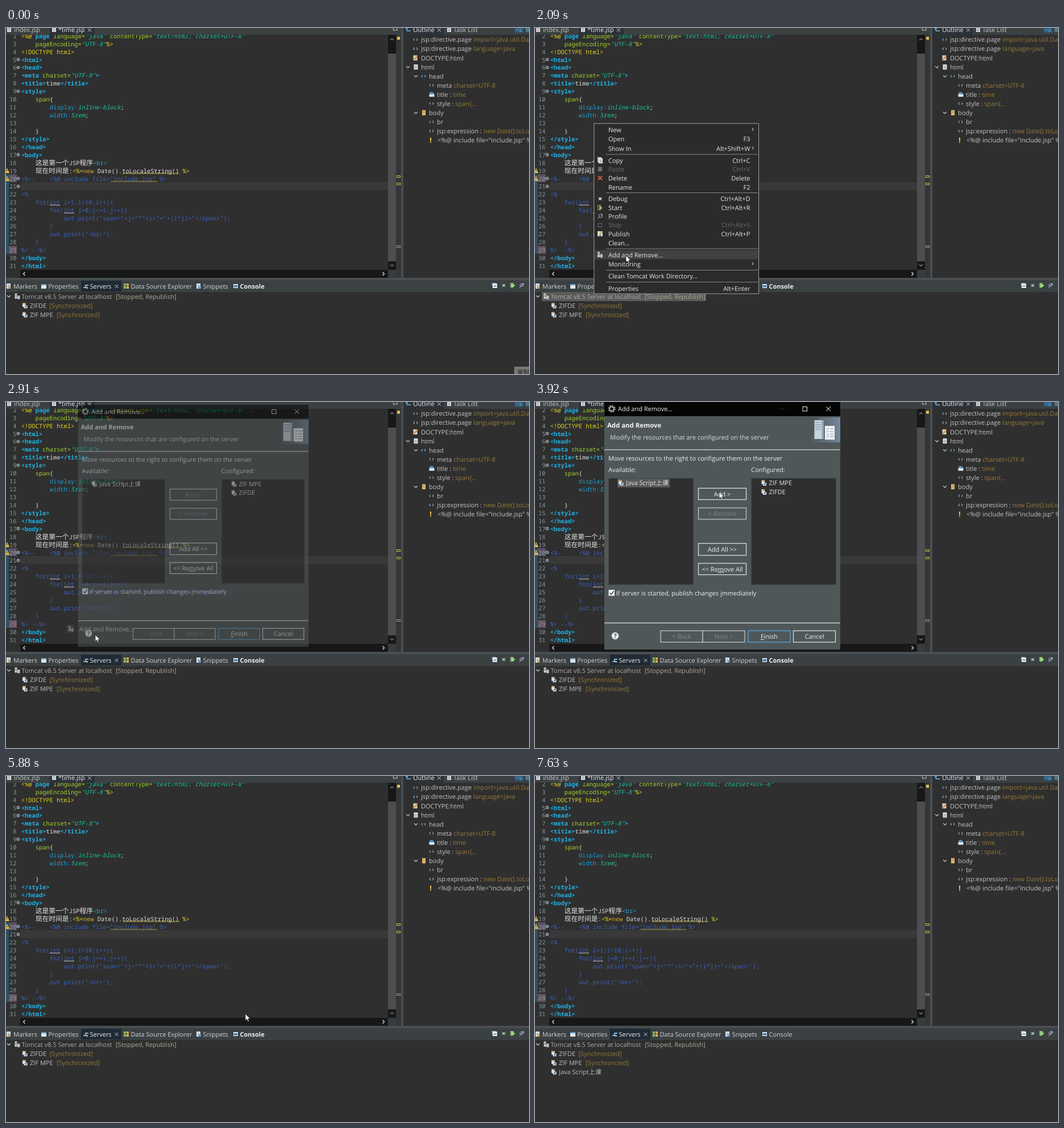
These frames come from a looping animation (920x608 px, 7.69 s). An HTML page:

```html
<!DOCTYPE html>
<html lang="zh">
<head>
<meta charset="utf-8">
<title>Add and Remove</title>
<style>
html, body { margin: 0; width: 100%; height: 100%; overflow: hidden; background: #2f2f2f; }
svg { display: block; width: 920px; height: 608px; }
text { font: 11px "Open Sans", "Noto Sans CJK SC", "Noto Sans CJK", sans-serif; white-space: pre; text-rendering: geometricPrecision; }
.code { font: 10.42px "Noto Sans Mono", monospace; }
.cjk { font: 11.8px "Noto Sans CJK SC", "Noto Sans CJK", sans-serif; }
.bold { font-weight: bold; }
.ital { font-style: italic; }
</style>
</head>
<body>
<svg id="stage" viewBox="0 0 920 608"></svg>
<script>
const LOOP = 7690;
const BG = '#2f2f2f', BAR = '#3b4043', FORM = '#4f5759', PALE = '#d2d2d2', BROWN = '#967937';

// drawing helpers
const esc = s => s.replace(/&/g, '&amp;').replace(/</g, '&lt;');
const rect = (x, y, w, h, fill, more = '') => `<rect x="${x}" y="${y}" width="${w}" height="${h}" fill="${fill}" ${more}/>`;
const line = (d, color, w = 1, more = '') => `<path d="${d}" fill="none" stroke="${color}" stroke-width="${w}" ${more}/>`;
// an underscore marks the underlined access key
const text = (x, y, s, fill = PALE, more = '') => `<text x="${x}" y="${y}" fill="${fill}" ${more}>` +
  esc(s).replace(/_(.)/, '<tspan text-decoration="underline">$1</tspan>') + '</text>';
const during = (spans, body) => `<g data-on="${spans}">${body}</g>`;
const cross = (x, y, r, color = PALE) => line(`M${x - r} ${y - r}l${2 * r} ${2 * r}m0 ${-2 * r}l${-2 * r} ${2 * r}`, color);
const chevron = (x, y, dir, color = PALE, r = 3) => {
  const a = { down: 90, up: -90, left: 180, right: 0 }[dir];
  return line(`M${-r / 2} ${-r}L${r / 2} 0L${-r / 2} ${r}`, color, 1.2, `transform="translate(${x} ${y}) rotate(${a})"`);
};
const wave = (x0, x1, y, color) => {
  let d = `M${x0} ${y}`;
  for (let x = x0, up = 1; x < x1; x += 2, up = -up) d += `l2 ${-up * 1.6}`;
  return line(d, color, 0.9);
};
const page = (x, y, color = '#e4e4e4') =>
  rect(x, y, 7, 9, color) + line(`M${x + 1.5} ${y + 3}h4m-4 2h4m-4 2h4`, '#5f7f9d', 0.8);
const moduleIcon = (x, y) => rect(x, y, 5.5, 7, '#d8dde0') + rect(x, y, 5, 2, '#c9a36a') +
  rect(x + 2.5, y + 4.5, 6, 5, '#e6e6e6') + `<circle cx="${x + 5.8}" cy="${y + 6.8}" r="1.7" fill="#4a86b8"/>`;
const tagIcon = (x, y) => chevron(x - 2.6, y, 'left', '#69a7d6', 2) + chevron(x + 2.6, y, 'right', '#69a7d6', 2);
const serverIcon = (x, y) => rect(x, y, 4, 9, '#d5dbe0') + line(`M${x} ${y + 2.5}h4m-4 2.5h4`, '#50616e') +
  rect(x + 4.5, y + 4, 4.5, 6, '#b3c6d4') + rect(x + 4.5, y + 4, 4.5, 1.5, '#d9b36a');

// source code: each line is a list of [style, words]
const INK = { w: '#e0e0e0', h: '#e4e4e4', b: '#1fb2e6', l: '#2aa5cf', a: '#a5d32e', v: '#17c69f',
  y: '#e3d51c', k: '#d6a62a', c: '#3b62bd', p: '#1d9fd4' };
const CODE = [
  [['y', '<%@ '], ['b', 'page '], ['a', 'language='], ['v', '"java" '], ['a', 'contentType='], ['v', '"text/html; charset=UTF-8"']],
  [['a', '    pageEncoding='], ['v', '"UTF-8"'], ['y', '%>']],
  [['y', '<!DOCTYPE html>']],
  [['b', '<html>']],
  [['b', '<head>']],
  [['b', '<meta '], ['a', 'charset='], ['v', '"UTF-8"'], ['b', '>']],
  [['b', '<title>'], ['w', 'time'], ['b', '</title>']],
  [['b', '<style>']],
  [['a', '    span'], ['w', '{']],
  [['p', '        display:'], ['v', 'inline-block'], ['w', ';']],
  [['p', '        width:'], ['v', '5rem'], ['w', ';']],
  [],
  [['w', '    }']],
  [['b', '</style>']],
  [['b', '</head>']],
  [['b', '<body>']],
  [['w', '    '], ['h', '这是第一个'], ['w', 'JSP'], ['h', '程序'], ['l', '<br>']],
  [['w', '    '], ['h', '现在时间是'], ['w', ':'], ['y', '<%='], ['k', 'new '], ['w', 'Date().toLocaleString() '], ['y', '%>']],
  [['c', '<%--    <%@ include file="include.jsp" %>']],
  [],
  [['c', '<%']],
  [['c', '    for(int i=1;i<10;i++){']],
  [['c', '        for(int j=0;j<=i;j++){']],
  [['c', '            out.print("span>"+j+"*"+i+"="+(i*j)+"</span>");']],
  [['c', '        }']],
  [['c', '        out.print("<br>");']],
  [['c', '    }']],
  [['c', '%> --%>']],
  [['b', '</body>']],
  [['b', '</html>']]
];
const FACE = { b: 'bold', v: 'ital', h: 'cjk' };
const mid = n => 28 + (n - 3) * 13.93;

function editor() {
  let s = rect(0, 257, 5, 140, '#2b5263') + rect(5, 257, 14, 14, '#5d4f62') + rect(5, 383, 14, 14, '#66525f');
  s += rect(26, 271, 646, 14, '#393939');
  CODE.forEach((parts, i) => {
    const n = i + 2, y = mid(n) + 3.7;
    s += text(18.5, y, '' + n, '#8797a0', 'class="code" text-anchor="end"');
    s += `<text class="code" x="26.7" y="${y}">` + parts.map(([k, w]) =>
      `<tspan fill="${INK[k]}" class="${FACE[k] || ''}">${esc(w)}</tspan>`).join('') + '</text>';
  });
  for (const n of [5, 6, 9, 17, 20, 21])
    s += `<circle cx="21.5" cy="${mid(n) - 0.5}" r="2.9" fill="#8f9a9f"/>` + line(`M20 ${mid(n) - 0.5}h3`, '#2f2f2f');
  for (const n of [19, 20])
    s += `<path d="M-2 ${mid(n) + 4}L2 ${mid(n) - 5}L6 ${mid(n) + 4}Z" fill="#e8c84a"/>` + line(`M2 ${mid(n) - 2}v3.5`, '#333');
  s += wave(205, 305, 256.5, '#d9c838') + wave(184, 265, 270.5, '#c9b030') + wave(77, 95, 312, '#ddd') + wave(102, 120, 326, '#ddd');
  return `<g clip-path="url(#pane)">${s}</g>`;
}

function scrollbars() {
  const mark = (y, c) => rect(687.5, y, 6, 3, 'none', `stroke="${c}"`);
  return rect(672, 12, 14, 412, '#4c4e4f') + rect(672, 12, 14, 33, '#171717') + rect(672, 410, 14, 15, '#171717') +
    chevron(679, 20, 'up', '#888') + chevron(679, 417, 'down', '#888') +
    rect(25, 425, 647, 14, '#171717') + chevron(32, 432, 'left', '#e8e8e8') + chevron(664, 432, 'right', '#e8e8e8') +
    rect(672, 425, 14, 14, '#393c3e') + rect(686, 12, 9, 427, '#333638') +
    rect(688, 15.5, 5, 5, '#e5c552') + mark(259.5, '#d6c32f') + mark(272.5, '#d6c32f') + mark(382.5, '#999');
}

function topTabs() {
  return rect(0, 0, 695, 12, BAR) + rect(77, 0, 79, 12, '#2b3238') + page(2, -2) + page(81, -2) +
    text(14, 7, 'index.jsp', '#c8c8c8') + text(92, 7, '*time.jsp', '#ececec') + cross(147, 3.5, 3) +
    rect(681.5, -2, 6.5, 6, 'none', 'stroke="#ccc"') +
    rect(699, 0, 221, 12, BAR) + rect(699, 0, 71, 12, '#2b3238') +
    line('M703 1h4m-2 4h7m-7 -7v7', '#7db6dc', 1.4) + text(716, 7, 'Outline', '#ececec') + cross(762, 3.5, 3) +
    rect(776, -1, 7, 8, '#d7dce0') + line('M777.5 2h4m-4 2.5h4', '#58788e') + text(787, 7, 'Task List', '#c8c8c8') +
    rect(895, 0, 15, 8, '#2e5f80') + line('M898 3h3m2 0h4m-4 3h4', '#7fb5d8') + rect(914, 0, 6, 7, '#4e7890');
}

// [text column, label, value, arrow]
const OUTLINE = [
  [730, 'jsp:directive.page ', 'import=java.util.Date'], [730, 'jsp:directive.page ', 'language=java'],
  [730, 'DOCTYPE:html', ''], [730, 'html', '', 1], [744, 'head', '', 1],
  [758, 'meta ', 'charset=UTF-8'], [758, 'title : ', 'time'], [758, 'style : ', 'span{...'], [744, 'body', '', 1],
  [758, 'br', ''], [758, 'jsp:expression : ', 'new Date().toLocaleString()'], [759, '<%@ include file="include.jsp" %>', '']
];
function outline() {
  return OUTLINE.map(([x, label, value, open], i) => {
    const y = 20.4 + i * 16.06, ix = x - 9.5;
    let icon = tagIcon(ix, y);
    if (i === 2) icon = rect(ix - 4, y - 4.5, 7, 9, '#d9cdb2') + line(`M${ix - 3} ${y + 3}l6 -6`, '#c47a34', 1.8);
    if (i === 3) icon = page(ix - 3, y - 4.5);
    if (i === 6) icon = rect(ix - 4, y - 1, 9, 5, '#e6edf2') + rect(ix - 3, y - 4, 6, 4, '#5d9bd0');
    if (i === 8) icon = rect(ix - 2.5, y - 4.5, 6, 9, '#e5bd6c') + line(`M${ix - 1} ${y - 2}h3m-3 2h3`, '#8d6c2f', 0.8);
    if (i === 11) icon = rect(ix - 3.5, y - 4.5, 2, 6, '#e6c24c') + rect(ix - 3.5, y + 2.5, 2, 2, '#e6c24c');
    return icon + (open ? chevron(x - 23, y, 'down') : '') +
      `<text x="${x}" y="${y + 4}" fill="#c4c4c4">${esc(label)}<tspan fill="${BROWN}">${esc(value)}</tspan></text>`;
  }).join('');
}

function serversView() {
  const y = 458;
  let s = rect(0, 439, 920, 4, '#484e51') + rect(0, 443, 920, 21, BAR) + rect(132, 444, 71, 19, '#1f2a34');
  s += page(1, 449) + '<circle cx="6.5" cy="456" r="2.2" fill="#d39a4a"/>' + text(13, y, 'Markers');
  s += rect(62, 450, 9, 8, '#dfe4e8') + rect(62, 450, 9, 2, '#6b9bc4') + text(74.5, y, 'Properties');
  s += line('M136 456h4v-4h5', '#79b4da', 2) + rect(141, 455, 3, 3, '#d9a355') + text(147.5, y, 'Servers', '#ececec') + cross(194.5, 454, 3);
  s += rect(207, 449, 4, 9, '#8fbf5a') + rect(212, 449, 4, 9, '#d6b24f') + line('M207 453h9', '#444') + text(219.5, y, 'Data Source Explorer');
  s += page(335, 449) + rect(339, 454, 4, 4, '#5d9bd0') + text(346.5, y, 'Snippets');
  s += rect(400, 450, 8, 7, '#dfe8f2') + rect(400.8, 452, 6.4, 3.5, '#3f77b5');
  s += during('0-7630', text(411.5, y, 'Console', '#ececec', 'class="bold"')) + during('7630-7690', text(411.5, y, 'Console'));
  s += rect(855, 448, 7, 6, '#8aa9bd') + rect(856, 449, 8, 8, '#dde6ec') + line('M857.5 453.5h5', '#456');
  s += '<circle cx="875.5" cy="452.5" r="2.2" fill="#8fc6a0"/>' + line('M872 450l7 5m0 -5l-7 5', '#8fc6a0', 0.8);
  s += rect(887, 448, 6, 8, '#7ea46a') + '<path d="M889 448l7 4.500l-7 4.500z" fill="#9bd77a"/>';
  s += '<circle cx="906.5" cy="452" r="2.4" fill="none" stroke="#a8bccb"/>' + line('M903 457l7 -8m-3 0h3.5v3.5', '#a8bccb');
  s += rect(0, 464, 920, 144, BG);
  s += during('740-950,1210-2780,5910-7630', rect(12, 464, 289, 16, '#5a5a5a'));
  s += chevron(5, 471.5, 'down') + serverIcon(15.5, 466.5);
  s += text(27.5, 475.5, 'Tomcat v8.5 Server at localhost', '#adaba6') + text(193, 475.5, '[Stopped, Republish]', '#b0a998');
  s += moduleIcon(29, 483) + text(42, 491.5, 'ZIFDE', '#bdbdbd') + text(76.5, 491.5, '[Synchronized]', BROWN);
  s += moduleIcon(29, 499) + text(42, 507.5, 'ZIF MPE', '#bdbdbd') + text(89, 507.5, '[Synchronized]', BROWN);
  s += during('5910-7690', moduleIcon(29, 515) + text(42, 523.5, 'Java Script上课', '#bdbdbd'));
  return s + during('0-70', rect(894, 595, 26, 13, '#777') + text(899, 609, '录制', '#222'));
}

// [label, centre, shortcut, disabled]
const MENU = [
  ['New', 178.5, '>'], ['Open', 195, 'F3'], ['Show In', 211.5, 'Alt+Shift+W>'],
  ['Copy', 232.5, 'Ctrl+C'], ['Paste', 248, 'Ctrl+V', 1], ['Delete', 263.5, 'Delete'], ['Rename', 279.5, 'F2'],
  ['Debug', 300, 'Ctrl+Alt+D'], ['Start', 315.5, 'Ctrl+Alt+R'], ['Profile', 331, ''], ['Stop', 346, 'Ctrl+Alt+S', 1],
  ['Publish', 361.5, 'Ctrl+Alt+P'], ['Clean...', 377.5, ''], ['Add and Remove...', 398.5, ''], ['Monitoring', 414.5, '>'],
  ['Clean Tomcat Work Directory...', 436, ''], ['Properties', 458, 'Alt+Enter']
];
const addItem = serverIcon(110, 393.5) + text(129, 402.5, 'Add and Remove...', '#e8e8e8');
function menu() {
  let s = rect(103.8, 167.8, 289.7, 299.2, '#2b2b2b', 'stroke="#a0a0a0"') + rect(105, 390, 287.5, 16, '#414141', 'id="hover"');
  for (const y of [222, 289.5, 388, 425.5, 446.5]) s += line(`M125 ${y}H392`, '#858585');
  for (const [label, y, keys, off] of MENU) {
    const c = off ? '#6c6c6c' : '#e8e8e8';
    s += text(129, y + 4, label, c) + text(378.5, y + 4, keys.replace('>', ''), c, 'text-anchor="end"');
    if (keys.endsWith('>')) s += chevron(383, y - 0.5, 'right', '#a8a8a8', 2.5);
  }
  s += page(110, 227, '#b9d2d6') + page(112, 229) + rect(111, 244, 7, 8, '#6c6c6c') + line('M111 260l7 7m0 -7l-7 7', '#d6603a', 2);
  s += '<circle cx="114.5" cy="300" r="2.2" fill="#cfe3d6"/>' + line('M111 297l7 6m0 -6l-7 6', '#cfe3d6', 0.8);
  s += rect(110.5, 311.5, 5, 8, 'none', 'stroke="#8aa86a"') + '<path d="M113 312l6 4l-6 4z" fill="#8cc06a"/>';
  s += '<circle cx="115.5" cy="330" r="3" fill="none" stroke="#a8bccb"/>' + line('M110 335l3 -3m3 -2l3 -3', '#a8bccb');
  s += rect(111.5, 343.5, 6, 6, 'none', 'stroke="#6c6c6c"');
  s += rect(110, 357, 4, 9, '#d5dbe0') + rect(114, 357, 5, 5, '#d9b36a') + rect(115, 361, 4, 5, '#c9d5dd') + serverIcon(110, 393.5);
  return s;
}

function button(x, y, w, h, label, on = true, edge = '#dcdcdc', fill = FORM) {
  return rect(x + 0.5, y + 0.5, w - 1, h - 1, fill, `stroke="${on ? edge : '#c2c5c6'}" stroke-width="1.3"`) +
    text(x + w / 2, y + h / 2 + 4, label, on ? '#f0f0f0' : '#7f8687', 'text-anchor="middle"');
}
const item = (x, y, label, more) => moduleIcon(x, y - 4.5) + text(x + 13, y + 4, label, '#e2e2e2', more);

function dialog() {
  const early = '0-3520', picked = '3520-4410', moved = '4410-7690';
  const add = on => button(287, 151, 85, 21, 'Add >', on);
  const all = on => button(287, 248, 85, 22, 'Add All >>', on);
  let s = rect(122, 0, 415, 435, FORM) + rect(122, 0, 415, 25, '#050505');
  s += '<circle cx="135" cy="12" r="3.8" fill="none" stroke="#b5b5b5" stroke-width="2"/>' +
    '<circle cx="135" cy="12" r="5.8" fill="none" stroke="#b5b5b5" stroke-width="1.6" stroke-dasharray="2.28"/>';
  s += text(146, 16, 'Add and Remove...', '#f0f0f0') + line('M430 12.500h9', '#333') +
    rect(471, 8.5, 7.5, 7.5, 'none', 'stroke="#f0f0f0"') + cross(516, 12, 4, '#f0f0f0');
  s += '<path d="M500 27H537V71H485Z" fill="url(#sheen)"/>' + rect(491.5, 32, 16, 33, '#c9d3dc') + rect(504.5, 32, 3, 33, '#93a3b3') +
    line('M493 36h10m-10 4h10m-10 4h10m-10 4h10', '#6b8096', 1.2) + rect(510, 42, 17, 24, '#eef1f4') +
    line('M513 47h4m2 0h6m-12 5h4m2 0h6m-12 5h4m2 0h6m-12 4h4m2 0h6', '#8099b0', 1.2);
  s += text(127, 44.5, 'Add and Remove', '#f4f4f4', 'class="bold" style="font-size:11.4px"') +
    text(132, 66, 'Modify the resources that are configured on the server', '#d8dadb');
  s += rect(122, 83, 415, 1.6, '#b9bdbe') + rect(122, 387.5, 415, 1.6, '#c3c6c7');
  s += text(129, 102.5, 'Move resources to the right to configure them on the server', '#f0f0f0') +
    text(129, 123, 'Available:', '#f0f0f0') + text(380, 123, 'Configured:', '#f0f0f0');
  for (const x of [129.5, 380.5]) s += rect(x, 134, 149, 187, BG, 'stroke="#42484a"');
  s += during(picked, rect(145, 134.5, 92, 15.5, '#5a5a5a')) + during('0-4410', item(147, 142, 'Java Script上课'));
  s += during('0-4410', item(398.5, 142, 'ZIF MPE') + item(398.5, 158, 'ZIFDE'));
  s += during(moved, item(398.5, 142, 'Java Script上课', 'class="ital"') + item(398.5, 158, 'ZIF MPE') + item(398.5, 174, 'ZIFDE'));
  s += during(early + ',' + moved, add(false)) + during(picked, add(true)) + button(287, 185.5, 85, 21, '< Remove', false);
  s += during('0-4410', all(true)) + during(moved, all(false)) + button(287, 283, 85, 21, '<< Re_move All');
  s += during(moved, rect(289.5, 285.5, 80, 16, 'none', 'stroke="#ececec" stroke-dasharray="1 1"'));
  s += rect(129.5, 330, 10.5, 10.5, '#f2f2f2') + line('M131.500 335.500l2.500 2.500l4.500 -5.500', '#333', 1.5) +
    text(142.5, 340, 'If server is started, publish changes _immediately', '#f0f0f0');
  s += '<circle cx="141" cy="411" r="6.2" fill="#eceeef"/>' + text(141, 415, '?', '#454c4e', 'class="bold" text-anchor="middle"');
  s += button(220.5, 401.5, 75, 21, '< Back', false) + button(294.5, 401.5, 75, 21, 'Next >', false) + button(454, 401.5, 75, 21, 'Cancel');
  s += during('0-5040', button(374.5, 401.5, 75, 21, '_Finish', true, '#5aa9dc'));
  return s + during('5040-7690', button(374.5, 401.5, 75, 21, '_Finish', true, '#6fb4e0', '#48596a'));
}

const stage = document.getElementById('stage');
stage.innerHTML = `<defs><clipPath id="pane"><rect x="0" y="12" width="672" height="413"/></clipPath>
<linearGradient id="sheen"><stop offset="0" stop-color="${FORM}"/><stop offset="1" stop-color="#74889c"/></linearGradient></defs>` +
  rect(0, 0, 920, 608, BG) + editor() + topTabs() + scrollbars() + rect(695, 0, 4, 439, '#484e51') + outline() + serversView() +
  `<g id="menu">${menu()}</g><g id="dialog">${dialog()}</g><g id="ghost">${rect(106, 391, 14, 15, '#484848') + addItem}</g>` +
  '<path id="cursor" d="M0 0V11.800L2.700 9.300L4.700 13.400L6.500 12.500L4.600 8.500H8.400Z" fill="#fff" stroke="#111" stroke-width=".7"/>';

// pointer path: time, x, y
const PATH = [
  [70, 912, 598], [140, 850, 590], [280, 640, 560], [420, 420, 515], [560, 250, 485], [700, 165, 470], [810, 140, 466],
  [880, 125, 458], [950, 112, 446], [1090, 105, 448], [1280, 103, 467], [1770, 104, 466], [1910, 125, 437], [2020, 155, 405],
  [2090, 160, 400], [2230, 159, 397], [2370, 157, 393], [2430, 157, 400], [2630, 157, 400], [2770, 157, 409], [2940, 157, 409],
  [3380, 205, 141], [3660, 206, 143], [3850, 318, 157], [3920, 324, 158], [4410, 324, 158], [4620, 332, 200], [4900, 400, 350],
  [5110, 424, 416], [5250, 421, 418], [6060, 421, 418], [6200, 434, 507], [6270, 538, 556], [6340, 620, 572], [6480, 735, 586],
  [6620, 810, 595], [6760, 858, 604], [6830, 866, 610]
];
const el = id => document.getElementById(id);
const parts = { menu: el('menu'), hover: el('hover'), dialog: el('dialog'), ghost: el('ghost'), cursor: el('cursor') };
const timed = [...stage.querySelectorAll('[data-on]')].map(node =>
  [node, node.dataset.on.split(',').map(s => s.split('-').map(Number))]);
const ramp = (t, a, b) => Math.min(1, Math.max(0, (t - a) / (b - a)));
const show = (node, alpha) => {
  node.style.display = alpha > 0 ? '' : 'none';
  node.setAttribute('opacity', alpha);
};

function pointer(t) {
  const i = Math.max(1, PATH.findIndex(p => p[0] > t));
  const [a, ax, ay] = PATH[i - 1], [b, bx, by] = PATH[i], k = ramp(t, a, b);
  return [ax + (bx - ax) * k, ay + (by - ay) * k];
}

function draw(t) {
  for (const [node, spans] of timed) node.style.display = spans.some(([a, b]) => t >= a && t < b) ? '' : 'none';

  const [x, y] = pointer(t);
  show(parts.cursor, t >= 70 && t < 6830 ? 1 : 0);
  parts.cursor.setAttribute('transform', `translate(${x} ${y})`);

  show(parts.menu, t >= 1560 && t < 2700 ? 0.4 + 0.6 * ramp(t, 1560, 1680) : 0);
  const over = MENU.find(m => !m[3] && Math.abs(y - m[1]) < 8);
  show(parts.hover, over && x > 104 ? 1 : 0);
  if (over) parts.hover.setAttribute('y', over[1] - 8);
  show(parts.ghost, t >= 2700 ? 1 - ramp(t, 2700, 3080) : 0);

  const opened = ramp(t, 2770, 3030), closed = ramp(t, 5660, 5860);
  show(parts.dialog, opened * (1 - closed));
  const z = 0.95 + 0.05 * opened - 0.06 * closed;
  parts.dialog.setAttribute('transform', `translate(329.5 218) scale(${z}) translate(-329.5 -218)`);
}

const start = performance.now();
function tick() {
  draw((performance.now() - start) % LOOP);
  requestAnimationFrame(tick);
}
tick();
</script>
</body>
</html>
```
